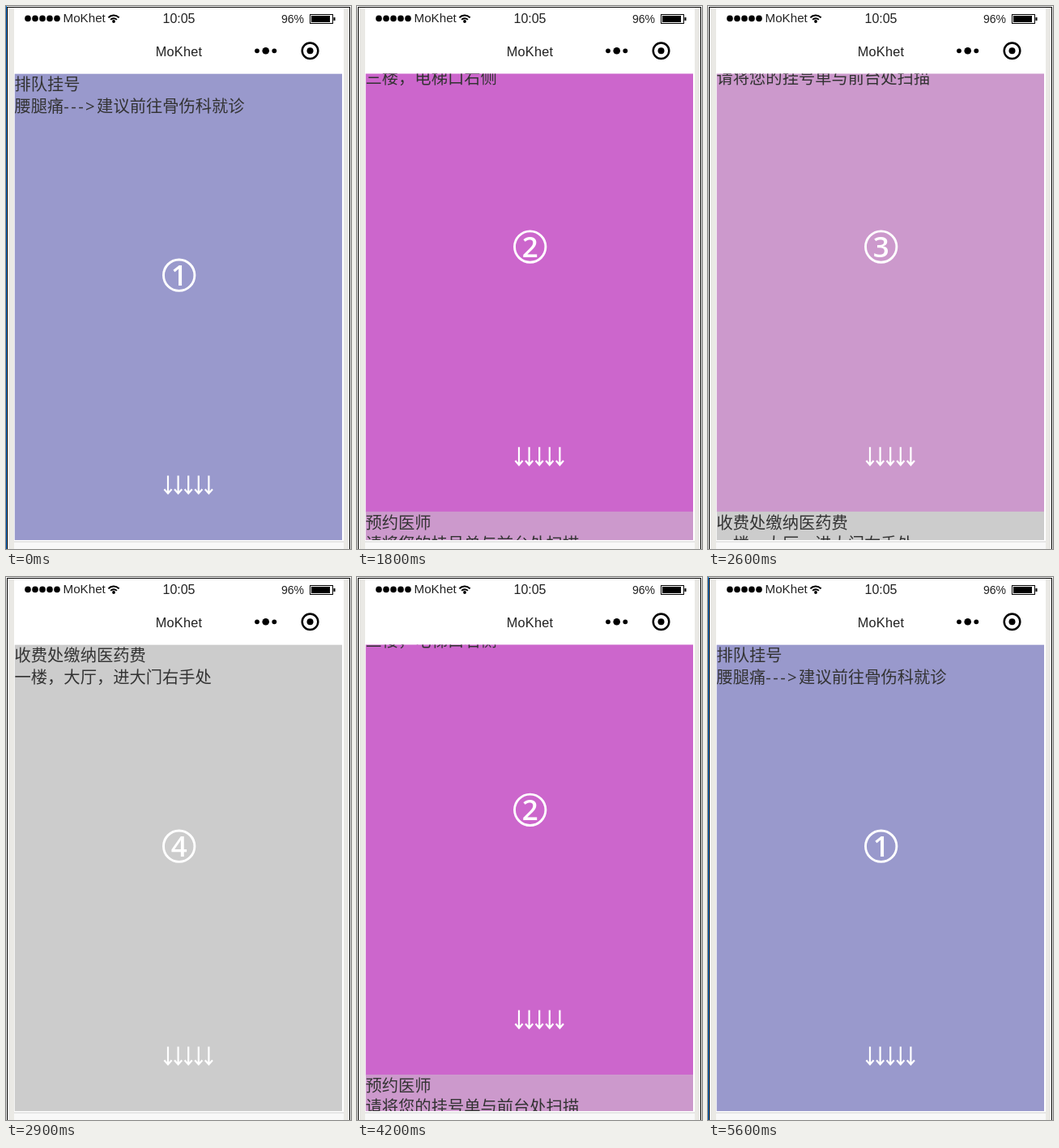
Animation, 426 px wide and 670 px high, one loop 5700 ms. Source, as an HTML page with a canvas:

```html
<!DOCTYPE html>
<html lang="zh-CN">
<head>
<meta charset="utf-8">
<title>就诊指引</title>
<style>
  html, body { margin: 0; width: 100%; height: 100%; overflow: hidden; background: #fff; }
  canvas { display: block; }
</style>
</head>
<body>
<canvas id="stage" width="426" height="670"></canvas>
<script>
const ctx = document.getElementById('stage').getContext('2d');
const LOOP = 5700, TICK = 100;
const VIEW = { x: 10.5, y: 83.4, w: 404.5, h: 575.6 };
const SANS = '"Liberation Sans", Arial, sans-serif';
const CJK = '"Noto Sans CJK SC", "Noto Sans CJK", sans-serif';
const LATIN = '"Open Sans", "Noto Sans", sans-serif';
const APP = 'MoKhet';

const pages = [
  { color: '#9999cc', lines: ['排队挂号', '腰腿痛--->建议前往骨伤科就诊'] },
  { color: '#cc66cc', lines: ['前往骨伤科', '三楼，电梯口右侧'] },
  { color: '#cc99cc', lines: ['预约医师', '请将您的挂号单与前台处扫描'] },
  { color: '#cccccc', lines: ['收费处缴纳医药费', '一楼，大厅，进大门右手处'] }
];

// Swipes: start time, duration, page moved to
const swipes = [
  [891, 290, 1], [1791, 290, 2], [2591, 290, 3],
  [3291, 290, 2], [3991, 290, 1], [4755, 245, 0]
];

function scrollAt(t) {
  let pos = 0;
  for (const [start, span, to] of swipes) {
    const k = Math.min(1, Math.max(0, (t - start) / span));
    pos += (to - pos) * (1 - (1 - k) ** 2);
  }
  return pos;
}

function rect(x, y, w, h, color) {
  ctx.fillStyle = color;
  ctx.fillRect(x, y, w, h);
}

function text(str, x, y, font, color, align = 'left', spacing = 0) {
  ctx.font = font;
  ctx.fillStyle = color;
  ctx.textAlign = align;
  ctx.letterSpacing = spacing + 'px';
  ctx.fillText(str, x, y);
  return ctx.measureText(str).width;
}

function dot(x, y, r, color = '#000') {
  ctx.fillStyle = color;
  ctx.beginPath();
  ctx.arc(x, y, r, 0, Math.PI * 2);
  ctx.fill();
}

function ring(x, y, r, width, color, from = 0, to = Math.PI * 2) {
  ctx.strokeStyle = color;
  ctx.lineWidth = width;
  ctx.beginPath();
  ctx.arc(x, y, r, from, to);
  ctx.stroke();
}

function textLine(str, y) {
  let x = VIEW.x;
  for (const part of str.split(/(-+>)/)) {
    const ascii = part.startsWith('-');
    x += text(part, x, y, `20.3px ${ascii ? LATIN : CJK}`, '#333', 'left', ascii ? 2.4 : 0);
  }
}

function arrow(x, y) {
  ctx.beginPath();
  ctx.moveTo(x, y);
  ctx.lineTo(x, y + 21.5);
  ctx.moveTo(x - 4.6, y + 16.8);
  ctx.lineTo(x, y + 22);
  ctx.lineTo(x + 4.6, y + 16.8);
  ctx.stroke();
}

function drawPage(page, index, top) {
  rect(VIEW.x, top, VIEW.w, VIEW.h + 0.5, page.color);
  page.lines.forEach((line, i) => textLine(line, top + 21 + i * 26.3));
  ring(213.7, top + 248.8, 19.2, 2.9, '#fff');
  text(String(index + 1), 213.7, top + 261.4, `600 35px ${LATIN}`, '#fff', 'center');
  ctx.strokeStyle = '#fff';
  ctx.lineWidth = 2.2;
  for (let i = 0; i < 5; i++) arrow(200 + i * 12.6, top + 496);
}

function drawFrame(edge) {
  rect(0, 0, 426, 670, '#fff');
  rect(2, 2, 422, 668, '#eae9e5');
  rect(10, 2, 407, 668, '#fff');
  rect(10, 661, 407, 9, '#f8f8f8');
  rect(10, 660.5, 407, 1, '#d2d2d2');
  rect(1, 1, 424, 1, '#000');
  rect(1, 1, 1, 669, '#000');
  rect(424, 1, 1, 669, '#000');
  rect(0, 0, 1, 670, edge);
}

function drawBars() {
  for (let i = 0; i < 5; i++) dot(27 + i * 9, 15.4, 3.8);
  text(APP, 70.5, 20.3, `15.2px ${SANS}`, '#222');

  const up = -Math.PI / 2, spread = 0.82;
  ring(133, 20.5, 9, 2, '#000', up - spread, up + spread);
  ring(133, 20.5, 5.3, 1.9, '#000', up - spread, up + spread);
  dot(133, 19, 1.9);

  text('10:05', 213.5, 21, `16px ${SANS}`, '#222', 'center');
  text('96%', 340, 21, `14px ${SANS}`, '#222');
  ctx.strokeStyle = '#000';
  ctx.lineWidth = 1;
  ctx.strokeRect(375.5, 10.5, 28, 11);
  rect(377, 12, 23, 8, '#000');
  rect(404.5, 14, 2, 4, '#000');

  text(APP, 213.5, 62, `16.3px ${SANS}`, '#222', 'center', 0.2);
  dot(310, 55.3, 2.9);
  dot(320.7, 55.3, 4.3);
  dot(331.3, 55.3, 2.9);
  ring(375.5, 55.3, 9.8, 2.5, '#000');
  dot(375.5, 55.3, 4);
}

function draw(now) {
  const t = Math.floor((now % LOOP) / TICK) * TICK;
  drawFrame(t < 700 || t >= 5600 ? '#0078d7' : '#fff');
  drawBars();

  const pos = scrollAt(t);
  ctx.save();
  ctx.beginPath();
  ctx.rect(VIEW.x, VIEW.y, VIEW.w, VIEW.h);
  ctx.clip();
  pages.forEach((page, i) => {
    if (Math.abs(i - pos) < 1) drawPage(page, i, VIEW.y + (i - pos) * VIEW.h);
  });
  ctx.restore();
}

const begin = performance.now();
function loop() {
  draw(performance.now() - begin);
  requestAnimationFrame(loop);
}
loop();
</script>
</body>
</html>
```
